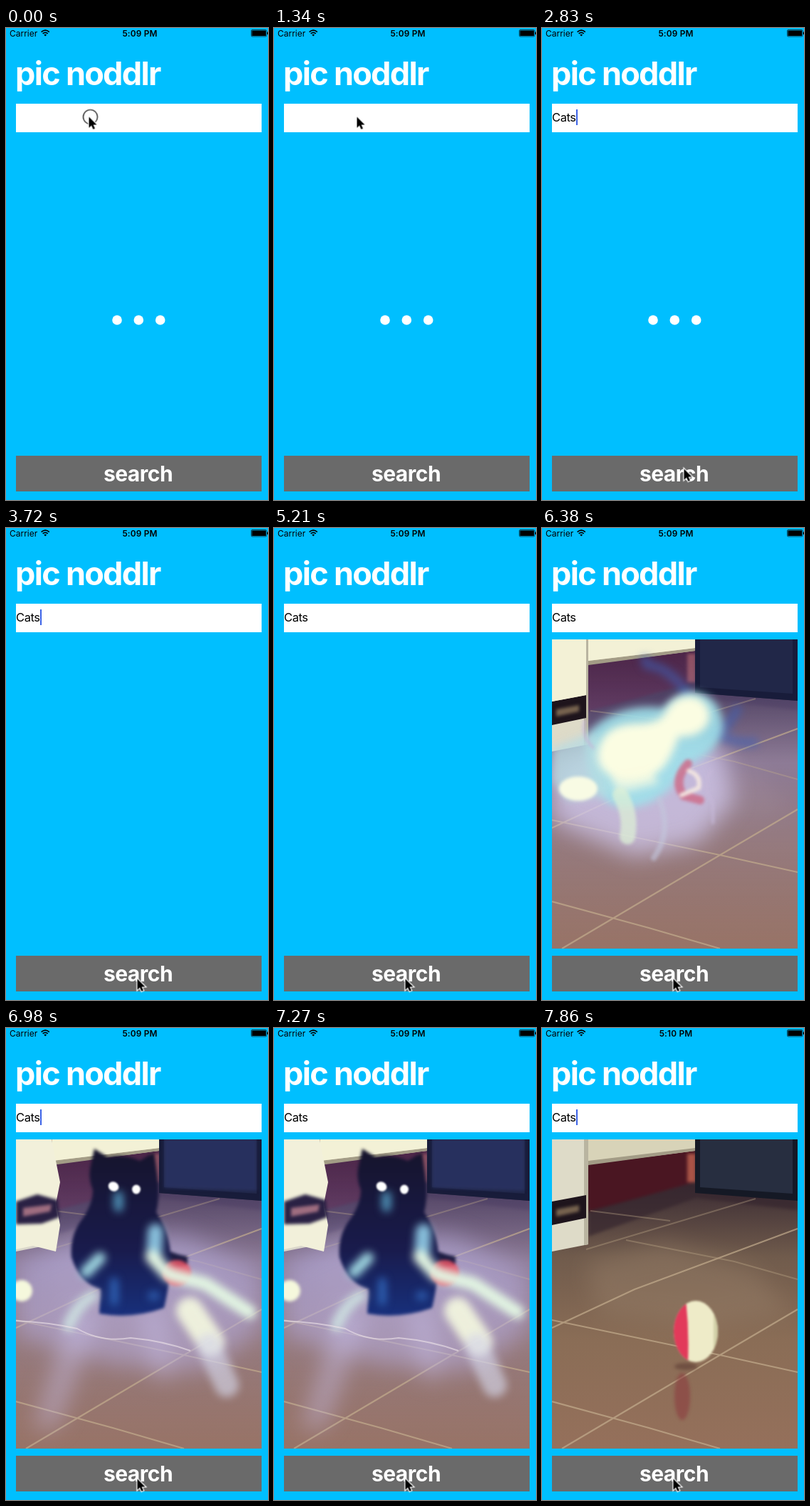
Animation of 368x661 px, one loop 8 s. Source, as an HTML page without scripts:

```html
<!DOCTYPE html>
<html lang="en">
<head>
<meta charset="utf-8">
<title>Picture search</title>
<style>
html, body { margin: 0; width: 100%; height: 100%; overflow: hidden; background: #00bfff; }
svg { display: block; width: 100%; height: 100%; }
text { font-family: Inter, "Open Sans", sans-serif; }
.semi { font-weight: 600; }
.bold { font-weight: 700; }
.white { fill: #fff; }
.soft { filter: blur(2px); }
.glow { filter: blur(6px); }
.haze { filter: blur(16px); }

.a { animation: 8s step-end infinite; }
.cursor { animation-name: cursor; }
.ring { animation-name: ring; }
.typed { animation-name: typed; }
.caret { animation-name: caret; }
.press { animation-name: press; }
.dots { animation-name: dots; }
.early { animation-name: early; }
.late { animation-name: late; }
.photo { animation-name: photo; }
.high { animation-name: high; }
.low { animation-name: low; }
.leap { animation-name: leap; }
.sit { animation-name: sit; }
.tint { animation-name: tint; }

@keyframes cursor {
  0% { transform: translate(116.5px, 124.5px); }
  29.7% { transform: translate(130px, 180px); }
  31.6% { transform: translate(170px, 320px); }
  33.4% { transform: translate(199px, 495px); }
  35.3% { transform: translate(199.5px, 617.5px); }
  37.2% { transform: translate(192px, 627px); }
  39.1%, 100% { transform: translate(184.5px, 631.5px); }
}
@keyframes ring {
  0%, 14.8%, 40.9% { opacity: 1; }
  1.8%, 16.7%, 42.8%, 100% { opacity: 0; }
}
@keyframes typed {
  0% { transform: none; }
  24.1% { transform: translateX(12px); }
  26% { transform: translateX(21px); }
  27.8% { transform: translateX(26px); }
  29.7%, 100% { transform: translateX(34px); }
}
@keyframes caret {
  0%, 42.8%, 53.8%, 65.1%, 76%, 89.1%, 100% { opacity: 0; }
  20.4%, 46.4%, 57.6%, 68.8%, 81.6%, 92.8% { opacity: 1; }
  40.9%, 51.9%, 63.2% { opacity: .4; }
}
@keyframes press {
  0%, 44.7%, 100% { opacity: 1; }
  40.9% { opacity: .45; }
  42.8% { opacity: .75; }
}
@keyframes dots { 0% { opacity: 1; } 44.7%, 100% { opacity: 0; } }
@keyframes early { 0% { opacity: 1; } 90.9%, 100% { opacity: 0; } }
@keyframes late { 0% { opacity: 0; } 90.9%, 100% { opacity: 1; } }
@keyframes photo { 0% { opacity: 0; } 68.8%, 100% { opacity: 1; } }
@keyframes low {
  0%, 96.4% { opacity: 1; transform: translateY(36px); }
  70.7%, 98.2%, 100% { opacity: 1; transform: none; }
  72.4% { opacity: 0; }
}
@keyframes high {
  0% { opacity: 0; }
  72.4% { opacity: 1; transform: none; }
  74.3% { opacity: .8; transform: translate(2px, 22px); }
  76%, 100% { opacity: 0; }
}
@keyframes leap {
  0%, 83.4%, 100% { opacity: 0; transform: none; }
  74.3% { opacity: .35; transform: translate(-24px, 8px); }
  76% { opacity: .65; transform: translate(-14px, 5px); }
  77.8% { opacity: .9; transform: translate(-6px, 2px); }
  79.7% { opacity: 1; transform: none; }
  81.6% { opacity: .55; transform: translate(8px, -4px); }
}
@keyframes sit {
  0%, 96.4%, 100% { opacity: 0; }
  81.6% { opacity: .4; }
  83.4% { opacity: .75; }
  85.3% { opacity: 1; }
  92.8% { opacity: .7; }
  94.6% { opacity: .35; }
}
@keyframes tint {
  0%, 96.4%, 100% { opacity: 0; }
  76% { opacity: .6; }
  79.7% { opacity: 1; }
  94.6% { opacity: .4; }
}
</style>
</head>
<body>
<svg viewBox="0 0 368 661" preserveAspectRatio="none">
  <defs>
    <clipPath id="frame"><path d="M14 156h345v433H14z"/></clipPath>
    <clipPath id="ball"><ellipse cx="216" cy="425" rx="31" ry="43"/></clipPath>
    <linearGradient id="floor" x2="0" y2="1">
      <stop offset=".15" stop-color="#3c2d34"/>
      <stop offset=".38" stop-color="#705b4c"/>
      <stop offset=".65" stop-color="#8a6d56"/>
      <stop offset="1" stop-color="#95705b"/>
    </linearGradient>
    <linearGradient id="mauve" x2="0" y2="1">
      <stop offset="0" stop-color="#4a3f94" stop-opacity=".3"/>
      <stop offset=".4" stop-color="#a99ae0" stop-opacity=".5"/>
      <stop offset="1" stop-color="#a07c84" stop-opacity=".3"/>
    </linearGradient>
    <linearGradient id="fur" x2="0" y2="1">
      <stop offset="0" stop-color="#16142c"/>
      <stop offset=".6" stop-color="#191b4c"/>
      <stop offset="1" stop-color="#18307c"/>
    </linearGradient>
  </defs>

  <path fill="#00bfff" d="M0 0h368v661H0z"/>

  <!-- status bar -->
  <text x="5" y="11.6" font-size="12">Carrier</text>
  <path fill="none" stroke="#000" stroke-width="1.7" d="M49.6 5.7q5.6-5 11.2 0M51.7 7.9q3.5-3 7 0"/>
  <path d="M53.3 9.4q1.9-1.5 3.8 0l-1.9 2.2z"/>
  <g class="semi" font-size="11.8" text-anchor="middle" letter-spacing=".2">
    <text class="a early" x="188" y="11.6">5:09 PM</text>
    <text class="a late" x="188" y="11.6" opacity="0">5:10 PM</text>
  </g>
  <rect x="344.5" y="2.5" width="21.5" height="9.5" rx="1.5" fill="none" stroke="#000" stroke-width=".8" opacity=".8"/>
  <path d="M345.4 3.4h19.7v7.7h-19.7zM366.8 5.5h1.2v3.6h-1.2z"/>

  <text class="bold white" x="13" y="80" font-size="45" letter-spacing="-1.7">pic noddlr</text>

  <!-- search field -->
  <path class="white" d="M14 106h345v40H14z"/>
  <text x="14" y="131" font-size="16.5" letter-spacing="-.4">Cats</text>
  <g class="a typed">
    <path class="white" d="M14.5 108h44v34h-44z"/>
    <path class="a caret" fill="#3b62e6" d="M14 114h2v22h-2z"/>
  </g>

  <g class="a dots white">
    <circle cx="156" cy="409" r="6.8"/><circle cx="186.3" cy="409" r="6.8"/><circle cx="216.7" cy="409" r="6.8"/>
  </g>

  <g class="a photo" clip-path="url(#frame)">
    <!-- room -->
    <path fill="url(#floor)" d="M14 156h345v433H14z"/>
    <path class="haze" fill="#98806a" opacity=".45" d="M60 330 170 300l130 40 50 60-120 20-150-20z"/>
    <g class="soft">
      <path fill="#4a1622" d="M60 190 216 168l-2 48-150 42z"/>
      <path fill="#a85346" d="M204 176h12v40h-12z"/>
      <path fill="#35262e" d="M65 256 216 217l143 24v14L216 238 65 292z" opacity=".7"/>
    </g>
    <path class="a tint" fill="url(#mauve)" d="M14 156h345v433H14z"/>
    <path fill="#d8d3b8" d="M65 156h150v16L65 191z"/>
    <path fill="#a39c86" d="M65 186 215 168v4L65 192z"/>
    <path fill="#151925" d="M215 156h144v86l-144-11z"/>
    <path fill="#272e40" d="M222 156h130v76l-130-9z"/>
    <path fill="#dedbc8" d="M14 156h51v147l-51 10z"/>
    <path fill="#b9b4a0" d="M59 156h6v147l-6 1z"/>
    <path fill="#1e141c" d="m14 243 48-9v32l-48 10z"/>
    <path class="soft" fill="#77634f" d="m20 254 32-6v9l-32 7z"/>
    <g class="a tint">
      <path fill="#f3f1d6" d="M65 156h150v12L65 186zM14 156h48v78l-48 9z"/>
      <path fill="#1d2050" opacity=".5" d="M215 156h144v86l-144-11z"/>
    </g>
    <g fill="none" stroke="#c3ad8e" stroke-width="2.2" opacity=".7">
      <path d="M14 420 130 366 359 281M14 409 250 458 359 482M28 589 250 458 359 394M14 523 150 560 250 589"/>
      <path d="M118 297 270 327 359 352M62 310 300 239M68 256 180 270" opacity=".5"/>
    </g>

    <!-- ball -->
    <g class="a low">
      <ellipse class="soft" cx="197" cy="516" rx="11" ry="33" fill="#8c3d40" opacity=".6"/>
      <ellipse class="soft" cx="202" cy="474" rx="16" ry="5" fill="#705042"/>
      <g filter="blur(1.5px)">
        <g clip-path="url(#ball)">
          <path fill="#eeebc8" d="M185 380h64v90h-64z"/>
          <path fill="#e23a5a" d="M183 380h19q5 44 3 88h-22z"/>
          <path fill="#d2d0a8" d="M241 380h8v90h-8z"/>
        </g>
      </g>
    </g>
    <g class="a high">
      <ellipse cx="200" cy="302" rx="31" ry="32" fill="#e0244e"/>
      <ellipse class="soft" cx="199" cy="295" rx="28" ry="15" fill="#ed9d9f"/>
      <circle cx="209" cy="273" r="29.5" fill="#f3f0d0"/>
      <path class="soft" fill="#406fb5" d="M166 265l18-3 2 14 8 16-16-1-12-12z"/>
    </g>

    <!-- leaping glow -->
    <g class="a leap">
      <path class="haze" fill="#d3cbf0" opacity=".75" d="M14 330 90 300l160 0 20 80-50 60-90 20-116-50z"/>
      <g class="glow">
        <path fill="none" stroke="#3f62b8" stroke-width="12" opacity=".6" d="M210 240q-30-46-62-48l-6-12M235 285q40 20 68 14M255 285l22-35"/>
        <path fill="#9fe0ea" opacity=".9" d="M62 290q40-46 108-38 28-32 60-18 26 15 24 50-10 36-54 48-20 52-76 60-66 0-62-102z"/>
        <path fill="#b7dde2" opacity=".75" d="M14 308 75 284l20 90-60 8-21-28z"/>
      </g>
      <g class="glow" fill="#fbfde2">
        <path d="M78 318q4-42 52-44 34 0 42-14 14-28 42-24 26 10 20 36-12 22-42 20-10 30-24 46-32 22-62 14-28-12-28-34z"/>
        <path d="M92 340l60-8 12 26-58 14z" opacity=".7"/>
      </g>
      <ellipse class="soft" cx="51" cy="365" rx="27" ry="17" fill="#f8fbe4"/>
      <g class="soft" fill="none" stroke-linecap="round">
        <path stroke="#dcefd6" stroke-width="22" opacity=".75" d="M110 374q16 28 10 58"/>
        <path stroke="#c3c6dc" stroke-width="8" opacity=".6" d="M165 380q18 45-8 82"/>
        <path stroke="#cf6a86" stroke-width="12" opacity=".8" d="M205 330q-22 24-6 45l23 6"/>
        <path stroke="#f2e5e0" stroke-width="6" d="M206 340q18 6 14 24l-24 10"/>
        <path stroke="#c6b8d8" stroke-width="3" d="M238 340q-16 20 2 45v28M60 270q-6 20 12 38"/>
      </g>
    </g>

    <!-- sitting cat -->
    <g class="a sit">
      <g class="haze">
        <path fill="#b9afe2" opacity=".55" d="M14 330 100 290h150l109 50v80l-80 60-130-10-135-40z"/>
        <path fill="#c9c0ea" opacity=".5" d="M95 390 40 560h30l60-160zM190 395l20 95h25l-20-100z"/>
      </g>
      <path fill="#f2f0da" d="M14 156h50l12 60-6 30 6 30-6 37-32-8-24 5z"/>
      <path class="soft" fill="#2a2144" d="m14 243 30-10 29 8 2 24-25 9-36 1z"/>
      <path class="soft" fill="#9f6d80" d="m24 252 40-5-2 10-38 7z"/>
      <path class="soft" fill="#2f3a72" opacity=".55" d="M222 156h130v72l-130-4z"/>
      <ellipse class="soft" cx="22" cy="368" rx="15" ry="15" fill="#f5f8dc"/>
      <g class="soft">
        <path fill="#1d1d43" d="M205 300q20 14 50 20v12q-25 8-54-8z"/>
        <path fill="url(#fur)" d="M120 188 124 169l19 12q23-5 45 5l20-12 4 28q5 30-1 56 24 36 20 82-4 32-9 52-45 16-91 8l2-34q-30-9-41-45-3-32 17-56 13-20 13-38-8-20-2-39z"/>
        <ellipse cx="240" cy="343" rx="20" ry="18" fill="#ec5062" opacity=".85"/>
      </g>
      <g class="glow" fill="none" stroke-linecap="round">
        <path stroke="#88bfdb" stroke-width="22" d="M210 285 208 318"/>
        <path stroke="#e2f5e2" stroke-width="19" d="M205 320 228 345 280 358 342 398"/>
        <path stroke="#f5fae0" stroke-width="38" opacity=".9" d="M258 396 288 440"/>
        <path stroke="#d5d6e8" stroke-width="34" opacity=".65" d="M285 445 310 500"/>
        <path stroke="#9fd6e0" stroke-width="16" d="M132 322 112 342"/>
        <path stroke="#cfe6e2" stroke-width="16" opacity=".85" d="M122 375q-22 12-34 42"/>
        <path stroke="#4f91b6" stroke-width="13" d="M158 235v16"/>
        <path stroke="#2f62b4" stroke-width="11" d="M152 355v28M205 375h5"/>
      </g>
      <g class="white" filter="blur(.8px)">
        <ellipse cx="151" cy="222" rx="7.5" ry="6.5" transform="rotate(25 151 222)"/>
        <ellipse cx="183" cy="226" rx="6" ry="6.5"/>
      </g>
      <path fill="none" stroke="#eee4ea" stroke-width="2" opacity=".6" d="M14 410q45 2 86 11 35 20 75 13 45 4 84 18"/>
    </g>
  </g>

  <!-- button -->
  <g class="a press">
    <path fill="#6a6a6a" d="M14 599h345v50H14z"/>
    <text class="bold white" x="185.5" y="635" font-size="30" letter-spacing="-.5" text-anchor="middle">search</text>
  </g>

  <g class="a cursor">
    <circle class="a ring" cx="2" cy="0" r="10" fill="none" stroke="#000" stroke-width="1.2"/>
    <path stroke="#fff" stroke-width="2.4" paint-order="stroke" d="M0 0v15.2l3.5-3.3 2.4 5.4 2.6-1.1-2.4-5.3h4.9z"/>
  </g>
</svg>
</body>
</html>
```
